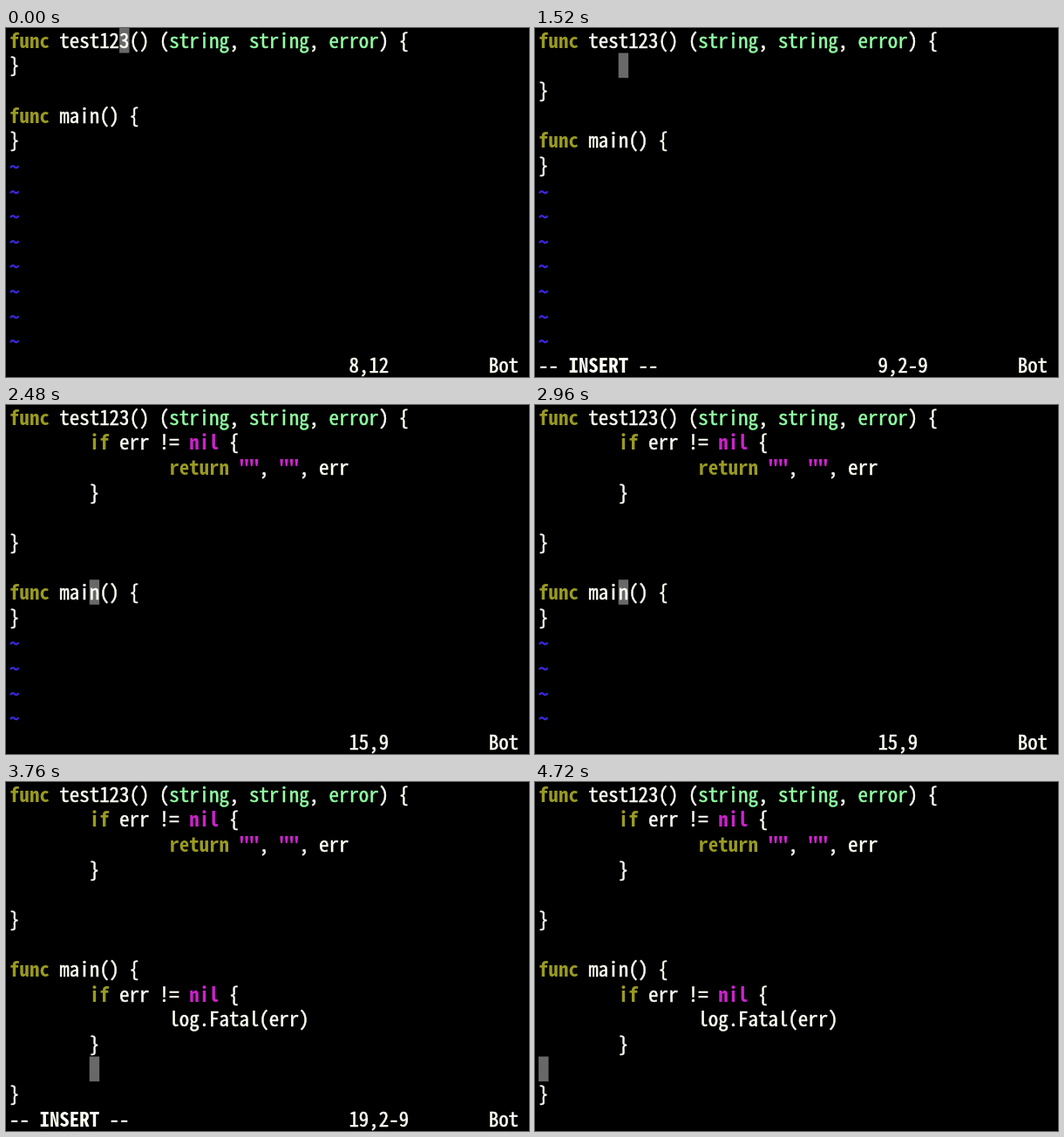
An HTML page for the animation above (5720 ms loop, 600 by 400 pixels).

```html
<!DOCTYPE html>
<html lang="en">
<head>
<meta charset="utf-8">
<title>Editor session</title>
<style>
  html, body { margin: 0; width: 100%; height: 100%; overflow: hidden; background: #000; }
  svg { display: block; width: 100vw; height: 100vh; }
  text { color: #fffff6; fill: currentColor; stroke: currentColor; stroke-width: .5px; }
  .key, .lit, .tilde, .mode { font-weight: 700; stroke-width: 0; }
  .key { color: #9a9a22; }
  .type { color: #92ffa4; }
  .lit { color: #cc22cc; }
  .tilde { color: #3a28dc; }
</style>
</head>
<body>
<svg viewBox="0 0 600 400">
  <rect width="600" height="400" fill="#000"/>
  <rect id="cursor" fill="#686868"/>
  <g id="screen"></g>
</svg>
<script>
const LOOP = 5720;
const CELL = 11.45, LINE = 28.6, LEFT = 4.1, BASE = 22.8;
const TILDE_DROP = 2.2;
const ROWS = 13;
const FONT = '"Noto Sans Mono CJK JP", "Noto Sans Mono CJK SC", "Noto Sans Mono", monospace';

const cursor = document.getElementById('cursor');
const screen = document.getElementById('screen');

// Choose the size whose natural advance fills one terminal cell.
const pen = document.createElement('canvas').getContext('2d');
pen.font = '100px ' + FONT;
screen.setAttribute('font-family', FONT);
screen.setAttribute('font-size', CELL * 100 / pen.measureText('0').width);
cursor.setAttribute('width', CELL);
cursor.setAttribute('height', LINE);

const tab = ' '.repeat(8);
const check = body => [tab + 'if err != nil {', tab + tab + body, tab + '}', ''];
const returned = check('return "", "", err');
const logged = check('log.Fatal(err)');

const program = (first, second) => [
  'func test123() (string, string, error) {', ...first, '}', '',
  'func main() {', ...second, '}'
];

// Each step: start time, buffer, cursor row and column, ruler, insert mode.
const steps = [];
const step = (at, first, second, row, col, ruler = '', insert = false) =>
  steps.push({ at, lines: program(first, second), row, col, ruler, insert });

function typeCheck(at, row, line, result, edit) {
  const show = (dt, body, r, c, ruler) => step(at + dt, ...edit(body), r, c, ruler, true);
  ['', 'e', 'err'].forEach((word, i) => {
    const n = word.length;
    show(i && 80 + i * 80, [tab + word], row, 8 + n, n ? `${line},${2 + n}-${9 + n}` : `${line},2-9`);
  });
  show(320, result, row + 3, 8, `${line + 3},2-9`);
  step(at + 560, ...edit(result), row + 3, 0);
}

step(0, [], [], 0, 11, '8,12');
typeCheck(1440, 1, 9, returned, body => [body, []]);
step(2160, returned, [], 5, 0, '13,1');
step(2320, returned, [], 6, 0, '14,0-1');
step(2480, returned, [], 7, 8, '15,9');
typeCheck(3360, 8, 16, logged, body => [returned, body]);

function styleOf(word) {
  if (/^(func|if|return)$/.test(word)) return 'key';
  if (/^(string|error)$/.test(word)) return 'type';
  if (word === 'nil' || word === '""') return 'lit';
  if (word === 'INSERT') return 'mode';
  return word === '~' ? 'tilde' : '';
}

function print(line, row, col = 0) {
  for (const m of line.matchAll(/\w+|""|[^\s\w]/g)) {
    const el = document.createElementNS(screen.namespaceURI, 'text');
    const style = styleOf(m[0]);
    const xs = [...m[0]].map((_, i) => (LEFT + (col + m.index + i) * CELL).toFixed(2));
    el.setAttribute('x', xs.join(' '));
    el.setAttribute('y', BASE + row * LINE + (style === 'tilde' ? TILDE_DROP : 0));
    el.setAttribute('class', style);
    el.textContent = m[0];
    screen.append(el);
  }
}

function draw(s) {
  screen.replaceChildren();
  for (let row = 0; row < ROWS; row++) print(s.lines[row] ?? '~', row);
  if (s.insert) print('-- INSERT --', ROWS);
  if (s.ruler) {
    print(s.ruler, ROWS, 34);
    print('Bot', ROWS, 48);
  }
  cursor.setAttribute('x', LEFT + s.col * CELL);
  cursor.setAttribute('y', s.row * LINE);
}

let shown;
const start = performance.now();
function tick() {
  const t = (performance.now() - start) % LOOP;
  const now = steps.filter(s => s.at <= t).pop();
  if (now !== shown) draw(shown = now);
  requestAnimationFrame(tick);
}
tick();
</script>
</body>
</html>
```
